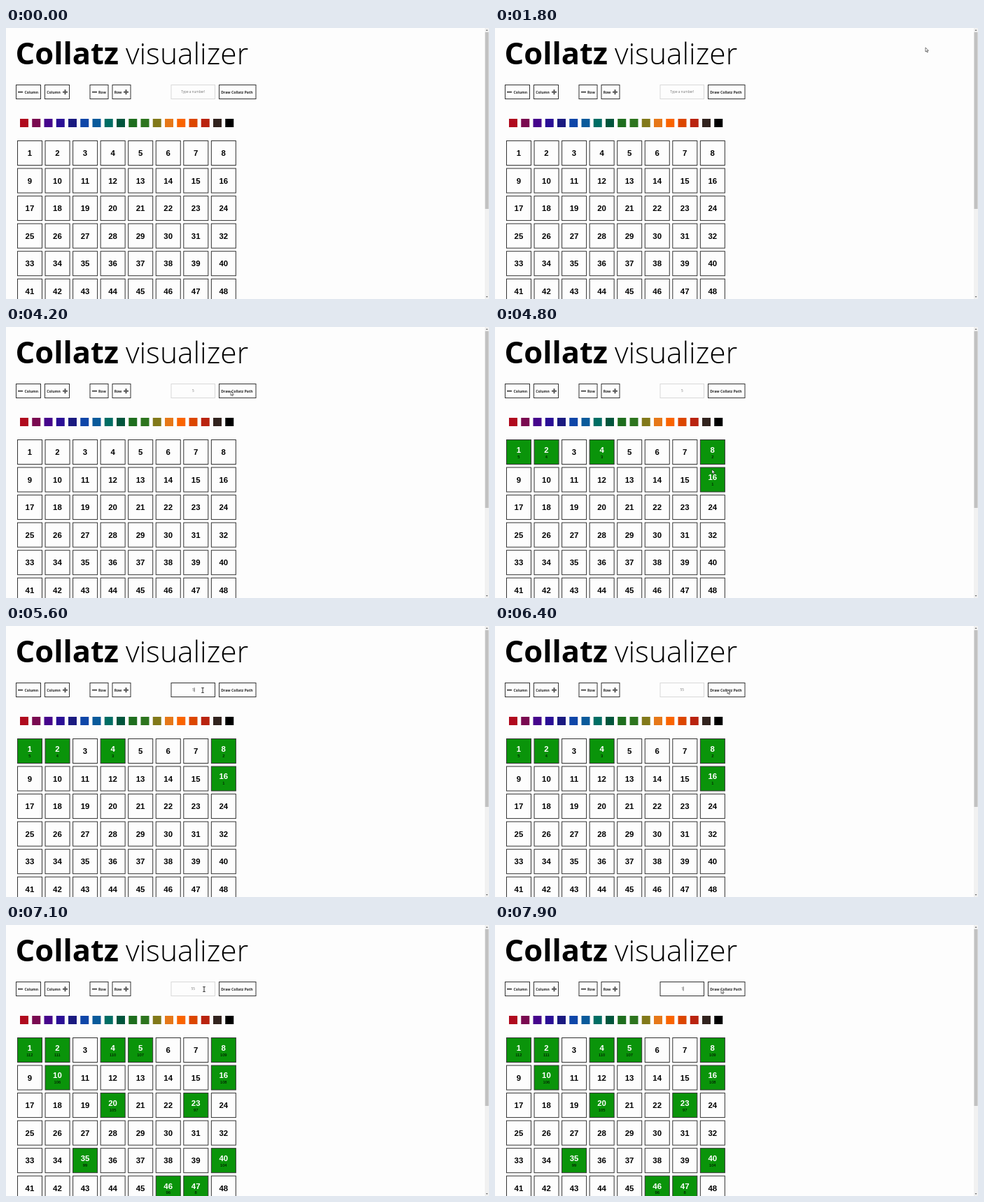
Write an HTML page that moves like this. It is 690 px wide and 388 px high and loops after 8 s.

```html
<!DOCTYPE html>
<html lang="en">
<head>
<meta charset="utf-8">
<title>Collatz visualizer</title>
<style>
html, body { margin: 0; width: 100%; height: 100%; overflow: hidden; background: #fdfdfd; }
svg { display: block; width: 690px; height: 388px; font-family: "Open Sans", "Noto Sans", sans-serif; }
.bold { font-weight: 700; }
.light { font-weight: 300; }
.label { font-size: 5.1px; font-weight: 700; fill: #222; }
.field { font-size: 4.7px; fill: #777; text-anchor: middle; }
.num, .step { font-family: "Liberation Sans", Arial, sans-serif; text-anchor: middle; }
.num { font-size: 11.4px; font-weight: 700; }
.step { font-size: 5.8px; }
</style>
</head>
<body>
<svg id="stage" viewBox="0 0 690 388"></svg>
<script>
const LOOP = 8000;
const stage = document.getElementById('stage');

function add(tag, attrs, text, parent = stage) {
  const el = document.createElementNS('http://www.w3.org/2000/svg', tag);
  for (const k in attrs) el.setAttribute(k, attrs[k]);
  if (text !== undefined) el.textContent = text;
  parent.appendChild(el);
  return el;
}
const box = (x, y, width, height, fill, stroke = 'none') =>
  add('rect', { x, y, width, height, fill, stroke });
const label = (x, y, cls, text) => add('text', { x, y, class: cls }, text);

// Title
add('text', { x: 13.5, y: 52, class: 'bold', 'font-size': 43.5 }, 'Collatz');
add('text', { x: 171, y: 52, class: 'light', 'font-size': 42.5 }, 'visualizer');

// Toolbar
const button = (x, w) => box(x, 81.5, w, 20, '#fdfdfd', '#333');
function icon(x, plus) {
  box(x, 90.7, 7, 2, '#555');
  if (plus) box(x + 2.5, 88.2, 2, 7, '#555');
}
button(14.5, 35); icon(17, false); label(26.5, 93.7, 'label', 'Column');
button(55.5, 35); icon(81, true); label(58.2, 93.7, 'label', 'Column');
button(120, 26); icon(123, false); label(132, 93.7, 'label', 'Row');
button(152, 26); icon(168, true); label(154.7, 93.7, 'label', 'Row');
const input = button(236, 62.5);
button(304.5, 52.5); label(307.3, 93.7, 'label', 'Draw Collatz Path');
const field = label(267.3, 93.3, 'field', '');
const caret = box(267, 88.3, 0.8, 6, '#333');

// Palette
['#b00a1e', '#7a0a50', '#46058c', '#2a0f96', '#1a1a80', '#0f46a8', '#0a5a9b', '#006e64', '#00553c',
 '#1e6e1e', '#2d751e', '#82791a', '#e67819', '#fa6400', '#dc4600', '#b9230f', '#32231e', '#000']
  .forEach((c, i) => box(20 + i * 17.25, 130, 12, 12, c));

// Number grid
const tiles = [];
for (let i = 0; i < 48; i++) {
  const x = 16.5 + (i % 8) * 39.55, y = 161.5 + Math.floor(i / 8) * 39.55;
  tiles.push({
    y,
    rect: box(x, y, 35, 35, '#fdfdfd', '#333'),
    num: label(x + 17.4, y + 21.6, 'num', i + 1),
    step: label(x + 17.4, y + 26.2, 'step', '')
  });
}

// Scrollbar
box(684, 0, 6, 388, '#f1f1f1');
box(684.5, 6, 5, 253, '#c1c1c1');
add('path', { d: 'M685.5 4l1.5-2 1.5 2zM685.5 384l1.5 2 1.5-2z', fill: '#777' });

// Pointer shapes, each with its hot spot at 0,0
const arrow = add('path', {
  d: 'M0 0V6L1.4 4.8 2.4 7 3.4 6.6 2.4 4.4H4.3Z', fill: '#fff', stroke: '#222', 'stroke-width': 0.6
});
const beam = add('path', {
  d: 'M-1.8-3.4H1.8M-1.8 3.4H1.8M0-3.4V3.4', fill: 'none', stroke: '#222', 'stroke-width': 0.9
});

// Tables of [time, ...values]
const moves = [
  [1800, 615, 28], [2150, 415, 20], [2350, 330, 42], [2500, 298, 68], [2700, 279.6, 88],
  [3800, 279.6, 88], [4150, 321, 92], [4350, 321, 92], [4650, 312, 210], [4800, 310, 204],
  [5200, 281, 92], [5750, 281, 92], [6200, 332, 91], [6600, 332, 91],
  [7050, 283, 92], [7400, 283, 92], [7800, 323, 92], [8000, 323, 92]
];
const texts = [[0, 'Type a number!'], [3800, '5'], [5700, '55'], [7500, '1']];
const focuses = [[0, false], [2900, true], [4200, false], [5300, true], [6400, false], [7300, true]];
const paths = [[0, 0], [4300, 5], [6500, 55]];

const at = (table, t) => table.filter(row => row[0] <= t).pop();

function collatz(n) {
  const steps = new Map();
  for (let k = 1; n > 1; k++) {
    n = n % 2 ? 3 * n + 1 : n / 2;
    steps.set(n, k);
  }
  return steps;
}

let shown = null;
function paintPath(start) {
  if (start === shown) return;
  shown = start;
  const steps = collatz(start);
  tiles.forEach((tile, i) => {
    const k = steps.get(i + 1);
    tile.rect.setAttribute('fill', k ? '#0a940a' : '#fdfdfd');
    tile.num.setAttribute('fill', k ? '#fff' : '#000');
    tile.num.setAttribute('y', tile.y + (k ? 18.4 : 21.6));
    tile.step.textContent = k || '';
  });
}

function paintPointer(t) {
  const i = moves.findIndex(m => m[0] > t);
  const a = moves[i - 1], b = moves[i];
  if (!a) {
    arrow.style.display = beam.style.display = 'none';
    return;
  }
  const p = (t - a[0]) / (b[0] - a[0]), e = p * p * (3 - 2 * p);
  const x = a[1] + (b[1] - a[1]) * e, y = a[2] + (b[2] - a[2]) * e;
  const typing = x > 236 && x < 298.5 && y > 81 && y < 102;
  arrow.style.display = typing ? 'none' : '';
  beam.style.display = typing ? '' : 'none';
  (typing ? beam : arrow).setAttribute('transform', `translate(${x} ${y})`);
}

function paintInput(t) {
  const [typedAt, text] = at(texts, t), [focusAt, focused] = at(focuses, t);
  const since = t - Math.max(typedAt, focusAt);
  const typed = typedAt > 0;
  field.textContent = text;
  field.setAttribute('fill', typed ? '#444' : '#888');
  input.setAttribute('stroke', focused ? '#333' : '#d9d9d9');
  caret.setAttribute('x', typed ? 267.3 + text.length * 1.35 : 267);
  caret.style.display = focused && since % 1000 < 500 ? '' : 'none';
}

function render(t) {
  paintPath(at(paths, t)[1]);
  paintInput(t);
  paintPointer(t);
}

const begin = performance.now();
function tick() {
  render((performance.now() - begin) % LOOP);
  requestAnimationFrame(tick);
}
tick();
</script>
</body>
</html>
```
